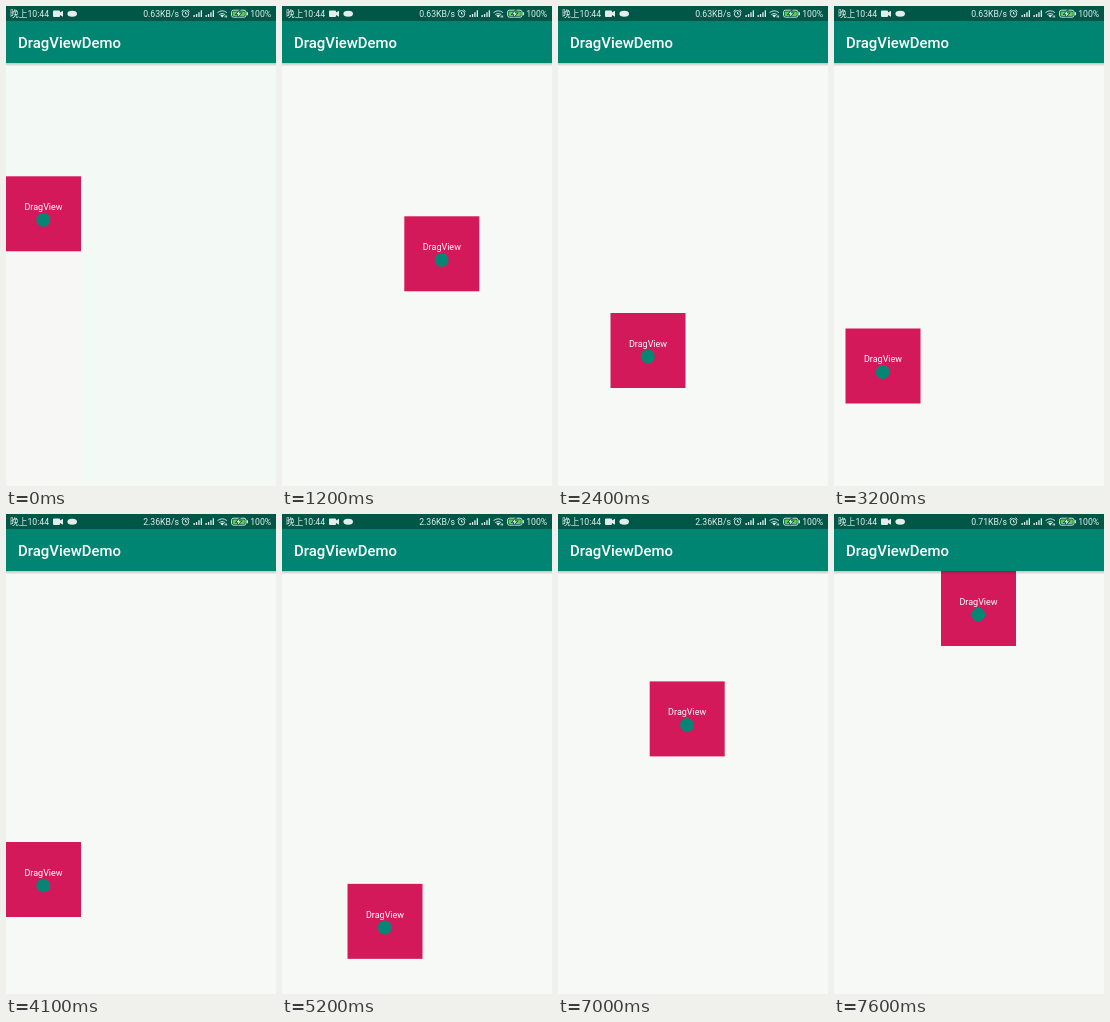
Write an HTML page that moves like this. It is 270 px wide and 480 px high and loops after 8000 ms.

```html
<!DOCTYPE html>
<html lang="en">
<head>
<meta charset="utf-8">
<title>Draggable view</title>
<style>
  html, body { margin: 0; width: 100%; height: 100%; overflow: hidden; background: #f7f9f6; }
  svg { display: block; width: 100%; height: 100%; }
  text { font-family: Roboto, "Noto Sans CJK SC", "Noto Sans CJK JP", sans-serif; fill: #fff; }
  .status { font-size: 8.7px; fill: #e3eeeb; }
  .line { fill: none; stroke: #e3eeeb; stroke-width: .9; }
  .solid { fill: #e3eeeb; }

  /* Background shade before the first drag */
  #tint { animation: tint 8s step-end infinite; }
  @keyframes tint { 6.25% { visibility: hidden; } }
</style>
</head>
<body>
<svg viewBox="0 0 270 480">
  <defs>
    <linearGradient id="shade" x2="0" y2="1">
      <stop offset="0" stop-color="#000" stop-opacity=".22"/>
      <stop offset="1" stop-color="#000" stop-opacity="0"/>
    </linearGradient>
    <path id="signal" d="M0 9h1.3v2H0zM2.4 8h1.3v3H2.4zM4.8 6.3h1.3V11H4.8zM7.2 4.3h1.3V11H7.2z"/>
  </defs>

  <rect width="270" height="480" fill="#f7f9f6"/>
  <g id="tint">
    <rect width="270" height="480" fill="#f3faf6"/>
    <rect y="245" width="75" height="235" fill="#f7f7f5"/>
  </g>

  <g id="card">
    <rect width="75" height="75" fill="#d4195b"/>
    <text x="37.5" y="33.7" font-size="9" text-anchor="middle">DragView</text>
    <circle cx="37.3" cy="43.6" r="7" fill="#078574"/>
  </g>

  <rect y="57" width="270" height="3.5" fill="url(#shade)"/>
  <rect width="270" height="57" fill="#008573"/>
  <rect width="270" height="15" fill="#005748"/>
  <text x="12" y="42" font-size="14.9" font-weight="500">DragViewDemo</text>

  <text class="status" x="4" y="11">晚上10:44</text>
  <path class="solid" d="M48 4.5h5q1 0 1 1v1l3-1.8v6l-3-1.7v1q0 1-1 1h-5q-1 0-1-1v-4.500q0-1 1-1z"/>
  <ellipse class="solid" cx="66.200" cy="7.700" rx="4.800" ry="3"/>

  <text class="status" id="speed" x="173" y="11" text-anchor="end"></text>
  <g class="line">
    <circle cx="179.500" cy="7.800" r="3.200"/>
    <path d="M179.500 6v2h1.600M175.500 5.500l2-1.800M183.500 5.500l-2-1.800"/>
  </g>
  <use class="solid" href="#signal" x="187.500"/>
  <use class="solid" href="#signal" x="199.500"/>
  <path class="line" stroke-width="1.200" d="M211.500 6.600q4.700-3.600 9.400 0M213.200 8.500q3-2.200 6 0"/>
  <path class="solid" d="M214.300 9.400q1.900-1.200 3.800 0l-1.900 2zM218.700 9.500h.9v2h-.9zM220.200 9.500h.9v2h-.9z"/>
  <rect class="line" x="225.500" y="4.200" width="14.500" height="7" rx="2"/>
  <rect x="226.700" y="5.400" width="12.100" height="4.600" rx="1" fill="#5fce4a"/>
  <path class="solid" stroke="#005748" stroke-width="1.600" paint-order="stroke"
        d="M233.600 4.600l-3.200 3.600h2l-.8 2.800 3.400-3.700h-2z"/>
  <path class="solid" d="M240.700 6.200h1.300v3h-1.300z"/>
  <text class="status" x="244.200" y="11">100%</text>
</svg>
<script>
  const LOOP = 8000, STEP = 100;
  const origin = { x: 0, y: 170.3 };

  const linear = k => k;
  const easeIn = k => k ** 1.6;
  const easeOut = k => 1 - (1 - k) ** 1.6;
  const move = (start, end, x, y, ease = linear) => ({ start, end, x, y, ease });

  // Each move begins where the previous one stopped; gaps are rests.
  const moves = [
    move(400, 1200, 122.3, 210.3, easeIn),
    move(1200, 1600, 195, 250, easeOut),
    move(1600, 2400, 52.5, 307, easeIn),
    move(2400, 2700, 0, 328, easeOut),
    move(3100, 3500, 46, 306),
    move(3500, 4000, 26, 328),
    move(4000, 4100, 0, 328),
    move(4500, 5400, 72, 374, easeOut),
    move(5700, 6200, 71.7, 405, easeOut),
    move(6400, 7000, 91.7, 167.4, easeIn),
    move(7000, 7500, 107, 92, easeOut),
    move(7500, 7600, 107, 57)
  ];

  const card = document.getElementById('card');
  const speed = document.getElementById('speed');

  function positionAt(t) {
    let { x, y } = origin;
    for (const m of moves) {
      if (t <= m.start) break;
      const k = m.ease(Math.min(1, (t - m.start) / (m.end - m.start)));
      x += (m.x - x) * k;
      y += (m.y - y) * k;
    }
    return [x, y];
  }

  function draw(now) {
    const t = Math.floor(now % LOOP / STEP) * STEP;
    card.setAttribute('transform', `translate(${positionAt(t)})`);
    speed.textContent = (t < 3600 ? '0.63' : t < 7600 ? '2.36' : '0.71') + 'KB/s';
  }

  const start = performance.now();
  function tick() {
    draw(performance.now() - start);
    requestAnimationFrame(tick);
  }
  tick();
</script>
</body>
</html>
```
